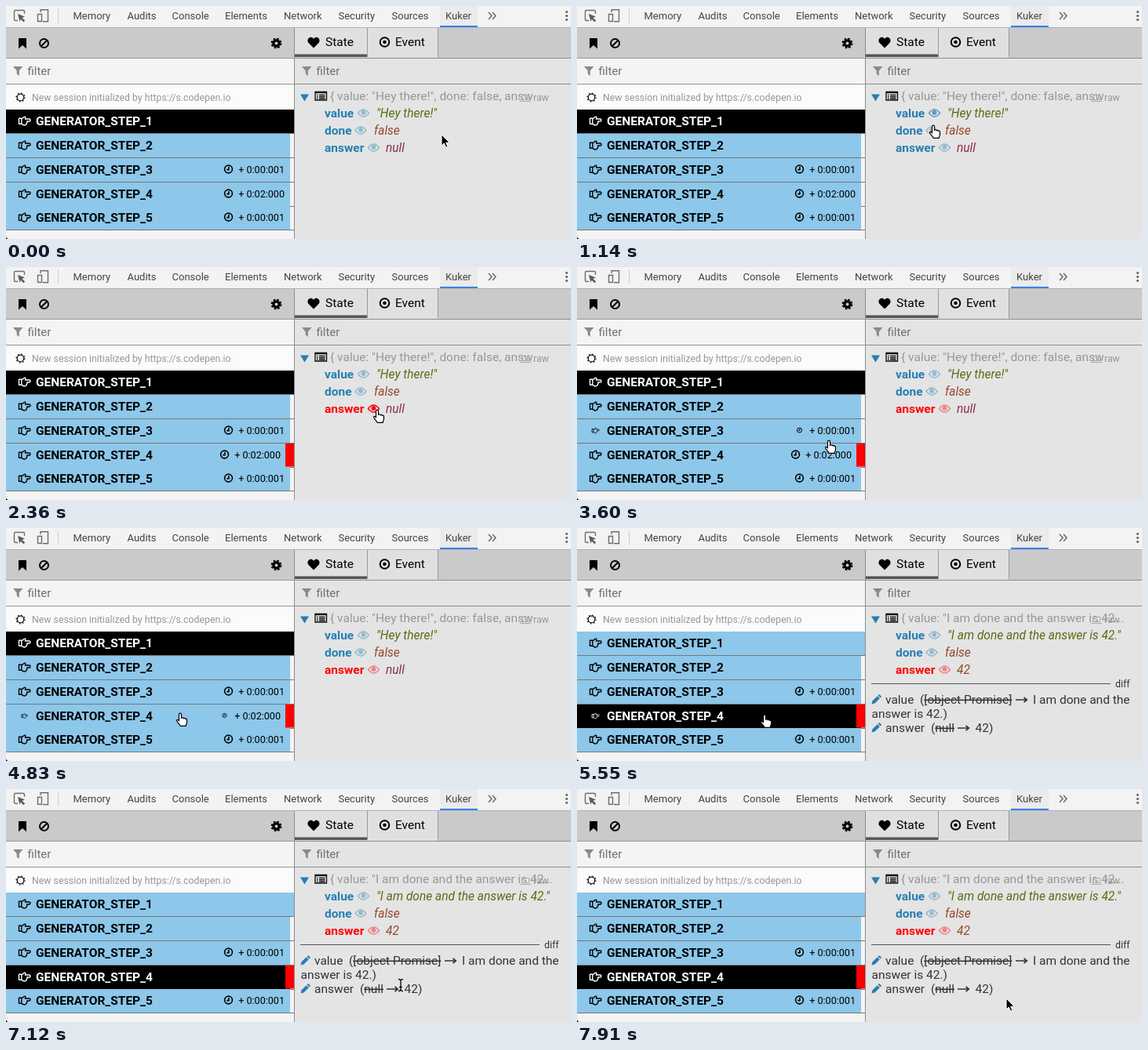
An HTML page that plays this animation: 720 by 297 pixels, repeating every 8 s.

```html
<!DOCTYPE html>
<html lang="en">
<head>
<meta charset="utf-8">
<title>Generator steps</title>
<style>
  html, body { margin: 0; width: 100%; height: 100%; overflow: hidden; background: #e4e4e4; }
  svg { display: block; width: 720px; height: 297px; font: 15.5px Roboto, sans-serif; }
  text { white-space: pre; }
  .tabs { font-size: 13px; fill: #444; }
  .small { font-size: 12.3px; }
  .time { font-size: 12.6px; text-anchor: end; }
  .key { font-weight: 700; fill: #267fb3; }
  .bold { font-weight: 700; }
  .val { font-style: italic; }
  .str { fill: #586e14; }
  .bool { fill: #96492b; }
  .nil { fill: #8c2f45; }
  .gray { fill: #979797; }
  .line { fill: none; stroke: currentColor; }
  .eye { color: #267fb3; opacity: .42; }
  .watched .key { fill: #f00; }
  .watched .eye { color: #f00; }
  .off { display: none; }
</style>
</head>
<body>
<svg viewBox="0 0 720 297">
  <defs>
    <g id="point" class="line" stroke-width="1.4" stroke-linejoin="round">
      <path d="M-7-3.2h3.3v7H-7zM-3.7-2.8C-1.4-3.2-.6-6 .9-5.3 2-4.7 1.1-3.4.9-2.5H6a1.5 1.5 0 0 1 0 3H3.2c.8 1 .3 1.9-.4 2.1.3 1-.2 1.7-.9 1.9C1.6 5.4 1 5.5 0 5.5c-1.5 0-2-.8-3.7-1.7"/>
    </g>
    <g id="clock" class="line" stroke-width="1.6">
      <circle r="4.9"/><path d="M.4-3V.6H-2.2"/>
    </g>
    <g id="eye" class="line" stroke-width="1.4">
      <path d="M-7 0Q0-9 7 0Q0 9-7 0Z"/><circle cy="-.6" r="2.2" fill="currentColor"/>
    </g>
    <path id="funnel" d="M0 0h12.5L7.8 5.5V12L4.7 9.6V5.5z" fill="#8a8a8a"/>
    <g id="pencil" fill="#267fb3"><path d="M0 12l.9-4L7.2 1.7l3.1 3.1L4 11.1zM8 .9l1-1q.6-.5 1.2 0l1.9 1.9q.5.6 0 1.2l-1 1z"/></g>
    <path id="to" class="line" stroke-width="1.7" d="M0 0H14M10.5-3.2L14.3 0 10.5 3.2"/>
    <path id="arrow" d="M0 0V14L3.3 11 5.6 16.2 7.9 15.2 5.7 10.2H10.3Z" stroke="#fff"/>
    <path id="hand" fill="#fff" stroke="#000" stroke-width="1.2" stroke-linejoin="round"
      d="M-1.5 1.7a1.5 1.5 0 0 1 3 0V6.4c.5-1 2.5-.8 2.7.4.6-.8 2.2-.5 2.4.7.8-.6 1.9-.2 1.9 1v3.3c0 1.5-1.3 2.5-1.3 4.6H.2c-.3-1.6-2.6-3.4-4.4-6.2-.8-1.5.8-2.5 1.9-1.3l.8 1z"/>
    <path id="beam" class="line" stroke-width="1.3" d="M-3-7.5q3 0 3 2v11q0 2-3 2M3-7.5q-3 0-3 2M3 7.5q-3 0-3-2M-1.8 2.5h3.6"/>
  </defs>

  <!-- browser tool tabs -->
  <rect width="720" height="28" fill="#f3f3f3"/>
  <g class="line" color="#6e6e6e" stroke-width="1.4">
    <path d="M15 18.5h-3q-1.5 0-1.5-1.5V7q0-1.5 1.5-1.5h10q1.5 0 1.5 1.5v3"/>
    <path d="M44 8V4.7h9.5v15H47M40.500 10.500h5v9h-5z"/>
    <path d="M66.500 4v18" stroke="#ccc" stroke-width="1"/>
  </g>
  <path d="M15 10l9 3.500-3.500 1.400 3.700 3.700-1.800 1.800-3.700-3.700L17.500 20z" fill="#5c5c5c"/>
  <rect x="553" width="48" height="27" fill="#ebebeb"/>
  <rect x="553" y="25" width="48" height="2" fill="#3b82ee"/>
  <g class="tabs" id="tabs"></g>
  <path class="line" color="#6e6e6e" stroke-width="1.6" d="M615 8l4 4.500-4 4.500M620 8l4 4.500-4 4.500"/>
  <g fill="#666"><circle cx="714.500" cy="7.500" r="1.600"/><circle cx="714.500" cy="12.500" r="1.600"/><circle cx="714.500" cy="17.500" r="1.600"/></g>

  <!-- toolbars -->
  <rect y="28" width="720" height="38" fill="#cacaca"/>
  <path d="M0 27.500H720" stroke="#b0b0b0"/>
  <rect x="368" y="28" width="182" height="38" fill="#e0e0e0"/>
  <rect x="368" y="61.500" width="92" height="3.500" fill="#555"/>
  <path d="M460.500 28V65M550.500 28V65" stroke="#999"/>
  <path d="M16 41h10v13.500l-5-4.500-5 4.500z"/>
  <g class="line" color="#000" stroke-width="2">
    <circle cx="48.500" cy="47.500" r="5.500"/><path d="M44.700 51.300l7.600-7.600"/>
    <circle cx="344.500" cy="47.500" r="3.600" stroke-width="3.200"/>
    <circle cx="344.500" cy="47.500" r="5.800" stroke-width="2.200" stroke-dasharray="2.600 1.955"/>
    <circle cx="482.500" cy="46" r="5.800"/>
  </g>
  <circle cx="482.500" cy="46" r="2.300"/>
  <path d="M392 53.500L385.500 47C382 42.500 388 36.500 392 41.800 396 36.500 402 42.500 398.500 47Z"/>
  <text x="407" y="51">State</text><text x="496" y="51">Event</text>

  <!-- left panel -->
  <rect y="66" width="367" height="231" fill="#f4f4f4"/>
  <rect y="101" width="367" height="31" fill="#fbfbfb"/>
  <path d="M0 66.500H367M0 99.500H367" stroke="#999"/>
  <use href="#funnel" x="9" y="77"/>
  <text x="27.500" y="88" fill="#707070" font-size="15">filter</text>
  <g class="line" color="#111" stroke-width="1.300">
    <circle cx="18.500" cy="116.500" r="4.300"/>
    <circle cx="18.500" cy="116.500" r="5.500" stroke-dasharray="1.500 2.820"/>
  </g>
  <text class="small gray" x="33" y="121">New session initialized by https://s.codepen.io</text>
  <g id="rows"></g>

  <!-- right panel -->
  <rect x="368" y="66" width="352" height="231" fill="#e4e4e4"/>
  <path d="M368 66.500H720M368 99.500H720M367.500 28V297" stroke="#8c8c8c"/>
  <use href="#funnel" x="377" y="77"/>
  <text x="395.500" y="88" fill="#707070" font-size="15">filter</text>
  <path d="M375 112.500h11l-5.500 9z" fill="#267fb3"/>
  <path class="line" color="#111" stroke-width="1.400" d="M394 109.500h14.500v10.500H394zM394 110.500h14.500M396 113.500h1.500M399 113.500h7.500M396 115.700h1.500M399 115.700h7.500M396 118h1.500M399 118h7.500"/>
  <text class="gray" id="summary" x="413" y="120"></text>
  <g class="line" color="#aaa"><path d="M657.500 113.500h9v6h-9zM655 121.500h14"/></g>
  <text x="672" y="121" font-size="12.300" class="gray">raw</text>
  <g id="value"><text class="key" x="406" y="142">value</text><use class="eye" href="#eye" x="455.500" y="136.500"/></g>
  <text class="val str" id="greeting" x="472" y="142"></text>
  <g id="done"><text class="key" x="406" y="164">done</text><use class="eye" href="#eye" x="452" y="158.500"/></g>
  <text class="val bool" x="469" y="164">false</text>
  <g id="answer"><text class="key" x="406" y="186">answer</text><use class="eye" href="#eye" x="468.500" y="180.500"/></g>
  <text class="val" id="result" x="484" y="186"></text>

  <g id="diff" fill="#333" color="#333">
    <path d="M375 198.500H680" stroke="#555"/>
    <text x="686" y="203" font-size="12.300">diff</text>
    <use href="#pencil" x="375.500" y="212.500"/>
    <text x="393" y="224">value</text><text x="437" y="224">(<tspan text-decoration="line-through">[object Promise]</tspan></text>
    <use href="#to" x="559" y="219"/>
    <text x="581" y="224">I am done and the</text>
    <text x="375.500" y="242">answer is 42.)</text>
    <use href="#pencil" x="375.500" y="248.500"/>
    <text x="393" y="260">answer</text><text x="451" y="260">(<tspan text-decoration="line-through">null</tspan></text>
    <use href="#to" x="485" y="255"/>
    <text x="507.500" y="260">42)</text>
  </g>
  <path d="M0 293Q0 297 4 297H0Z"/>
  <use id="cursor" color="#000"/>
</svg>
<script>
const $ = id => document.getElementById(id);
const LOOP = 8000, TICK = 87.9;
const WATCH = 26, MARK = 27, SELECT = 56;

const tabs = { Memory: 85.5, Audits: 154.5, Console: 211.5, Elements: 279, Network: 354,
  Security: 423.5, Sources: 491.5, Kuker: 560 };
$('tabs').innerHTML = Object.entries(tabs)
  .map(([name, x]) => `<text x="${x}" y="17">${name}</text>`).join('');

const tops = [132, 163, 194, 225, 255];
const times = ['', '', '+ 0:00:001', '+ 0:02:000', '+ 0:00:001'];
$('rows').innerHTML = tops.map((y, i) => {
  const time = times[i] && `<g id="time${i}"><g transform="translate(283.5 ${y + 14})"><use id="clock${i}" href="#clock"/></g>
    <text class="time" x="355" y="${y + 18.5}">${times[i]}</text></g>`;
  return `<g id="row${i}">
    <rect id="bar${i}" y="${y}" width="${i ? 362 : 367}" height="30"/>
    <g transform="translate(23.5 ${y + 14.5})"><use id="icon${i}" href="#point"/></g>
    <text class="bold" x="38" y="${y + 20}">GENERATOR_STEP_${i + 1}</text>${time}</g>
    <path d="M0 ${y + 30.5}H367" stroke="#777"/>`;
}).join('') + '<rect id="mark" x="356" y="225" width="11" height="29.5" fill="#f00"/>';

// Tracks are [tick, ...values] points.
const path = [[0, 555, 164], [2, 546, 161], [5, 496, 147], [8, 457, 134], [9, 454, 132], [10, 454, 132],
  [12, 452, 145], [13, 454, 152], [16, 453, 164], [20, 467, 180], [21, 473, 182], [36, 473, 182],
  [38, 421, 197], [41, 321, 221], [43, 275, 229], [46, 232, 234], [49, 222, 236], [62, 222, 236],
  [64, 255, 239], [67, 358, 249], [70, 440, 255], [72, 466, 256], [77, 528, 264], [82, 497, 247],
  [87, 532, 260], [90, 547, 267]];
const hover = {
  2: [[39, 1], [41, .62], [42, .62], [44, 1]],
  3: [[41, 1], [43, .62], [54, .62], [55, .53], [56, .62], [66, .62], [68, 1]]
};
const glow = {
  value: [[7, .42], [9, 1], [12, 1], [14, .42]],
  done: [[13, .42], [15, .8], [17, .8], [19, .42]],
  answer: [[19, .42], [21, 1], [36, 1], [39, .42]]
};

function at(track, k) {
  const i = track.findIndex(p => p[0] >= k);
  if (i < 0) return track[track.length - 1].slice(1);
  if (!i) return track[0].slice(1);
  const a = track[i - 1], b = track[i], f = (k - a[0]) / (b[0] - a[0]);
  return a.slice(1).map((v, j) => v + (b[j + 1] - v) * f);
}

function shape(k, x, y) {
  const onEye = x < 478 && x > 446 && y < 198;
  if (x < 367 || (k < 62 && onEye)) return '#hand';
  return k > 62 && x > 375 && y < 264.5 ? '#beam' : '#arrow';
}

function render(k) {
  const after = k >= SELECT, marked = k >= MARK, active = after ? 3 : 0;
  tops.forEach((_, i) => {
    const on = i === active, ink = on ? '#fff' : '#000';
    $('bar' + i).setAttribute('fill', on ? '#000' : '#8dc7e9');
    $('row' + i).setAttribute('fill', ink);
    $('row' + i).setAttribute('color', ink);
  });
  $('mark').classList.toggle('off', !marked);
  $('time3').classList.toggle('off', after);
  $('time3').setAttribute('transform', `translate(${marked ? -5 : 0})`);
  for (const i in hover) {
    const s = `scale(${at(hover[i], k)})`;
    $('icon' + i).setAttribute('transform', s);
    $('clock' + i).setAttribute('transform', s);
  }
  for (const id in glow) $(id).querySelector('.eye').style.opacity = at(glow[id], k);
  $('answer').classList.toggle('watched', k >= WATCH);

  $('summary').textContent = after
    ? '{ value: "I am done and the answer is 42...'
    : '{ value: "Hey there!", done: false, answ';
  $('greeting').textContent = after ? '"I am done and the answer is 42."' : '"Hey there!"';
  $('result').textContent = after ? '42' : 'null';
  $('result').setAttribute('class', after ? 'val bool' : 'val nil');
  $('diff').classList.toggle('off', !after);

  const [x, y] = at(path, k);
  $('cursor').setAttribute('href', shape(k, x, y));
  $('cursor').setAttribute('transform', `translate(${Math.round(x)} ${Math.round(y)})`);
}

let last = -1;
function loop() {
  const k = Math.floor(performance.now() % LOOP / TICK + .25);
  if (k !== last) render(last = k);
  requestAnimationFrame(loop);
}
loop();
</script>
</body>
</html>
```
